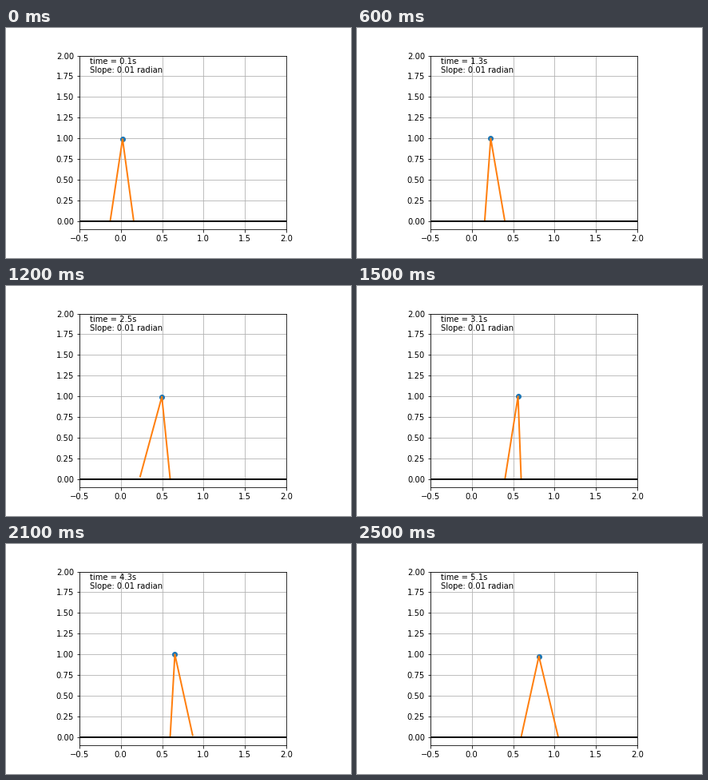
A matplotlib script for the animation above (2600 ms loop, 432 by 288 pixels).

```python
import math

import matplotlib.pyplot as plt
from matplotlib.animation import FuncAnimation

FRAMES, INTERVAL = 26, 100
SLOPE = 0.01
STANCE_RATE = 1.4    # inverted pendulum rate of the standing leg
SWING_RATE = 1.12    # pendulum rate of the swinging leg
SWING_SIZE = 0.34
HEEL_STRIKE = 1.85

# foot x, reference time, cosh and sinh weights, time the swing passes centre
STEPS = [
    (0.156, 0.1, 0.125, -0.166, 0.736),
    (0.597, 3.9, -0.029, -0.0562, 3.6),
]


def walker(t):
    """Return the x and y coordinates of stance foot, hip and swing foot."""
    foot, t_ref, a, b, t_swing = STEPS[t > HEEL_STRIKE]
    tau = STANCE_RATE * (t - t_ref)
    lean = a * math.cosh(tau) + b * math.sinh(tau)
    stance = lean + SLOPE
    swing = lean / 2 + SLOPE + SWING_SIZE * math.sin(SWING_RATE * (t - t_swing))
    hip_x, hip_y = foot - math.sin(stance), math.cos(stance)
    return ([foot, hip_x, hip_x + math.sin(swing)],
            [0, hip_y, hip_y - math.cos(swing)])


plt.rcParams["font.family"] = "DejaVu Sans"
fig, ax = plt.subplots(figsize=(6, 4), dpi=72)
fig.subplots_adjust(left=0.125, right=0.9, bottom=0.125, top=0.88)
ax.set_aspect("equal")
ax.set(xlim=(-0.5, 2), ylim=(-0.1, 2))
ax.set_xticks([-0.5 + 0.5 * i for i in range(6)])
ax.set_yticks([0.25 * i for i in range(9)])
ax.grid()

hip, = ax.plot([], [], "o", color="C0")
legs, = ax.plot([], [], color="C1", lw=2)
ax.plot([-0.5, 2], [0, 0], color="black", lw=2)
clock = ax.text(0.05, 0.95, "", transform=ax.transAxes)
ax.text(0.05, 0.9, f"Slope: {SLOPE:.2f} radian", transform=ax.transAxes)


def update(frame):
    t = 0.1 + 0.2 * frame
    xs, ys = walker(t)
    hip.set_data(xs[1:2], ys[1:2])
    legs.set_data(xs, ys)
    clock.set_text(f"time = {t:.1f}s")
    return hip, legs, clock


anim = FuncAnimation(fig, update, frames=FRAMES, interval=INTERVAL, repeat=True)
plt.show()
```
